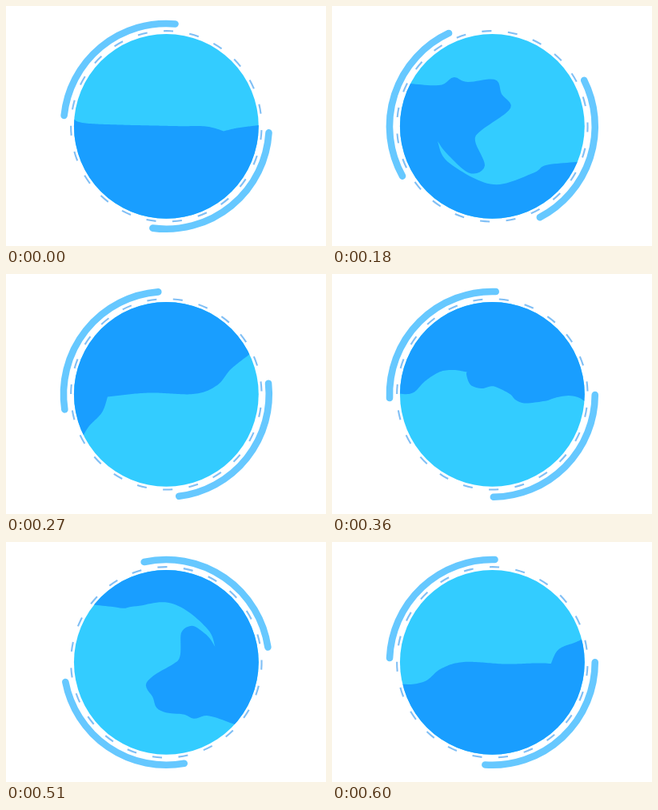
An HTML page for the animation above (630 ms loop, 400 by 300 pixels).

```html
<!DOCTYPE html>
<html lang="en">
<head>
<meta charset="utf-8">
<title>Wave loader</title>
<style>
  html, body { margin: 0; width: 100%; height: 100%; overflow: hidden; background: #fff; }
  svg { display: block; width: 100vw; height: 100vh; }
</style>
</head>
<body>
<svg viewBox="0 0 400 300">
  <defs><clipPath id="clip"><circle class="disc"/></clipPath></defs>
  <circle class="disc" fill="#33ccff"/>
  <g clip-path="url(#clip)"><path id="wave" fill="#199eff"/></g>
  <circle id="dashes" fill="none" stroke="#80bff5" stroke-width="2.1"/>
  <g id="arcs" fill="none" stroke="#66c8ff" stroke-width="8.6" stroke-linecap="round"></g>
</svg>
<script>
const LOOP = 630, HALF = LOOP / 2, STEP = 30;
const CX = 200.35, CY = 150.35, R = 115.4, RAD = Math.PI / 180;
const $ = id => document.getElementById(id);
const set = (el, attrs) => Object.entries(attrs).forEach(([k, v]) => el.setAttribute(k, v));
const mix = (a, b, k) => a + (b - a) * k;
const polar = (r, deg) => [CX + r * Math.cos(deg * RAD), CY + r * Math.sin(deg * RAD)];
const radius = p => Math.hypot(p[0] - CX, p[1] - CY);
const angle = p => Math.atan2(p[1] - CY, p[0] - CX) / RAD;
const turn = (p, deg) => polar(radius(p), angle(p) + deg);
// Turn the middle and the rim by different amounts
const swirl = (p, inner, rim) => turn(p, mix(inner, rim, (radius(p) / R) ** 3));
const text = p => p[0].toFixed(2) + ' ' + p[1].toFixed(2);

// Monotone cubic curve through [time, value] points
function curve(...pts) {
  const d = pts.slice(1).map(([t, v], i) => (v - pts[i][1]) / (t - pts[i][0]));
  const m = pts.map((_, i) => {
    if (i === 0) return d[0];
    if (i === d.length) return d[i - 1];
    return 2 * d[i - 1] * d[i] / (d[i - 1] + d[i]);
  });
  return t => {
    let i = 0;
    while (i < d.length - 1 && t > pts[i + 1][0]) i++;
    const [[t0, a], [t1, b]] = [pts[i], pts[i + 1]];
    const h = t1 - t0, k = (t - t0) / h, q = 1 - k;
    return (1 + 2 * k) * q * q * a + k * q * q * h * m[i] +
      k * k * (3 - 2 * k) * b - k * k * q * h * m[i + 1];
  };
}

// Catmull-Rom spline through flat coordinates, resampled to n + 1 even points
function spline(flat, n) {
  const p = [];
  for (let i = 0; i < flat.length; i += 2) p.push([flat[i], flat[i + 1]]);
  const at = i => p[Math.max(0, Math.min(p.length - 1, i))];
  const dense = [p[0]], len = [0];
  for (let i = 0; i < p.length - 1; i++) {
    const [a, b, c, d] = [at(i - 1), at(i), at(i + 1), at(i + 2)];
    for (let s = 1; s <= 12; s++) {
      const k = s / 12;
      const pt = [0, 1].map(j => 0.5 * (2 * b[j] + (c[j] - a[j]) * k +
        (2 * a[j] - 5 * b[j] + 4 * c[j] - d[j]) * k * k +
        (3 * b[j] - a[j] - 3 * c[j] + d[j]) * k * k * k));
      const last = dense[dense.length - 1];
      len.push(len[len.length - 1] + Math.hypot(pt[0] - last[0], pt[1] - last[1]));
      dense.push(pt);
    }
  }
  const out = [], total = len[len.length - 1];
  for (let i = 0, j = 0; i <= n; i++) {
    const goal = total * i / n;
    while (j < len.length - 2 && len[j + 1] < goal) j++;
    const k = (goal - len[j]) / (len[j + 1] - len[j] || 1);
    out.push([mix(dense[j][0], dense[j + 1][0], k), mix(dense[j][1], dense[j + 1][1], k)]);
  }
  return out;
}

// Waterline: the crest runs to the tip of the tail, the back runs from the tip to the rim.
// Points are kept unrotated, spin is the turn of the whole line.
function pose(t, spin, flip, crest, back) {
  const line = spline(crest, 90).concat(spline(crest.slice(-2).concat(back), 50).slice(1));
  return { t, spin, pts: line.map(p => turn(p, -spin - flip)) };
}
const swirled = (from, t, inner, rim) => ({
  t, spin: from.spin + rim, pts: from.pts.map(p => swirl(p, inner - rim, 0))
});

const calm = pose(0, 0, 0,
  [84,141, 105,147, 208,150, 250,150.5, 272,156.5],
  [289,152.5, 316,149]);
const curl = pose(135, 6, 180,
  [315,167, 290,164, 262,172, 245,180, 210,180, 199,165, 204,148, 190,118, 169,120.5, 155,107,
   168,92, 207,79.5, 250,98.5],
  [222,81, 188,76, 149,97, 120,128, 86,137]);
const hook = pose(180, 25, 0,
  [97,97, 135,99, 152,89, 169,95, 204,92, 212,110, 223,128, 186,156, 179,169, 191,200, 172,209,
   144,185, 132,169],
  [145,195, 200,223, 251,209, 267,199, 306,195]);
const spike = pose(225, 84, 180,
  [208,266, 192,236, 162,215, 159,195, 153,177, 169,157, 215,149, 257,123, 270,138],
  [258,98, 238,76, 214,66, 204,47, 188,34]);
const settle = pose(270, 153, 0,
  [305,100, 281,119, 264,139, 235,150, 178,148.5, 127,153.5],
  [120,173, 104,190, 96,203]);
const poses = [
  calm, swirled(curl, 120, -15, -4), curl, hook, spike, settle, swirled(settle, 285, 1, 12),
  { ...calm, t: HALF, spin: 180 }
];

const spinAt = curve(...poses.map(p => [p.t, p.spin]));
const arcAt = curve([0, 3.6], [120, 72], [180, 151], [270, 171.5], [450, 185.8], [540, 301.3],
  [600, 360], [LOOP, 363.6]);
const dashAt = curve([0, 5.2], [120, 70.7], [180, 110.1], [270, 167.4], [450, 261.1],
  [540, 317.4], [LOOP, 365.2]);

function wavePath(t) {
  const h = t % HALF, flip = t < HALF ? 0 : 180;
  let i = 0;
  while (i < poses.length - 2 && h >= poses[i + 1].t) i++;
  const a = poses[i], b = poses[i + 1], k = (h - a.t) / (b.t - a.t);
  const spin = spinAt(h) + flip;
  const pts = a.pts.map((p, j) =>
    turn([mix(p[0], b.pts[j][0], k), mix(p[1], b.pts[j][1], k)], spin));
  const start = angle(pts[0]), end = angle(pts[pts.length - 1]);
  const rim = [end, end + 60, end + 120, start].map(deg => polar(300, deg));
  return 'M' + pts.concat(rim).map(text).join('L') + 'Z';
}

function addArc(from, span) {
  const r = 128.4, el = document.createElementNS('http://www.w3.org/2000/svg', 'path');
  set(el, { d: `M${text(polar(r, from))}A${r} ${r} 0 0 1 ${text(polar(r, from + span))}` });
  $('arcs').append(el);
}

const rotate = deg => ({ transform: `rotate(${deg} ${CX} ${CY})` });

function draw(now) {
  const t = Math.floor((now % LOOP) / STEP) * STEP;
  set($('wave'), { d: wavePath(t) });
  set($('arcs'), rotate(arcAt(t)));
  set($('dashes'), rotate(dashAt(t) - DASH / 2));
}

const DASH = 5.8, GAP = 360 / 23 - DASH;
document.querySelectorAll('.disc').forEach(el => set(el, { cx: CX, cy: CY, r: R }));
set($('dashes'), { cx: CX, cy: CY, r: 119.2, pathLength: 360, 'stroke-dasharray': `${DASH} ${GAP}` });
addArc(0, 94);
addArc(182.4, 89);

let first = null;
function tick(now) {
  if (first === null) first = now;
  draw(Math.max(0, now - first));
  requestAnimationFrame(tick);
}
draw(0);
requestAnimationFrame(tick);
</script>
</body>
</html>
```
